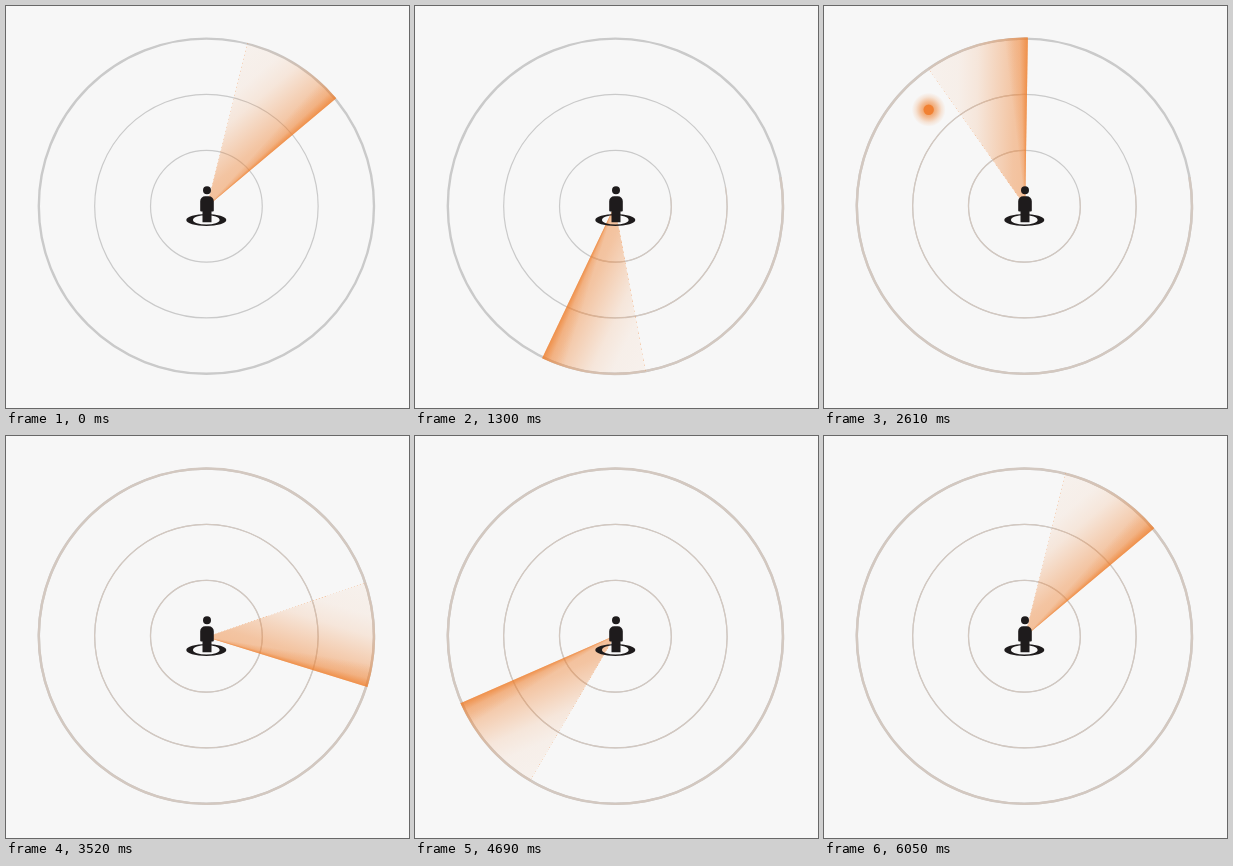
Animation of 403 by 402 pixels, one loop 6.12 s. Source, as an HTML page with a canvas:

```html
<!DOCTYPE html>
<html>
<head>
<meta charset="utf-8">
<style>
html, body { margin: 0; width: 100%; height: 100%; overflow: hidden; background: #f7f7f7; }
canvas { display: block; }
</style>
</head>
<body>
<canvas id="stage" width="403" height="402"></canvas>
<script>
const ctx = document.getElementById('stage').getContext('2d');
const LOOP = 6120, STEPS = 89, STEP = LOOP / STEPS;
const CX = 200.4, CY = 200.2, RADIUS = 167.6;
const SPAN = 36, TURN = 360 / 44, TINT_FROM = 80;
const rad = deg => deg * Math.PI / 180;

function gradient(g, stops) {
  for (const [at, alpha] of stops) g.addColorStop(at, `rgba(238,126,44,${alpha})`);
  return g;
}

const beamFill = gradient(ctx.createLinearGradient(0, 0, -99, 0),
  [[0, .46], [.13, .42], [.5, .14], [.7, .07], [1, .05]]);
// darkens towards the leading edge, tapering to the apex
const edgeFill = gradient(ctx.createConicGradient(rad(-90 - SPAN), 0, 0),
  [[0, 0], [(SPAN - 8) / 360, 0], [(SPAN - 3) / 360, .25], [SPAN / 360, .72], [.5, .72]]);
const glow = gradient(ctx.createRadialGradient(0, 0, 3, 0, 0, 17),
  [[0, .8], [.35, .52], [.7, .18], [1, 0]]);

function rings(color, from, to) {
  ctx.strokeStyle = color;
  for (let i = 1; i <= 3; i++) {
    ctx.lineWidth = i === 3 ? 2.4 : 1.2;
    ctx.beginPath();
    ctx.arc(CX, CY, RADIUS * i / 3, rad(from - 90), rad(to - 90));
    ctx.stroke();
  }
}

function beam(heading) {
  ctx.save();
  ctx.translate(CX, CY);
  ctx.rotate(rad(heading));
  ctx.translate(.8, 0);
  ctx.beginPath();
  ctx.moveTo(0, 0);
  ctx.arc(0, 0, RADIUS + 1.2, rad(-90 - SPAN), rad(-90));
  for (const fill of [beamFill, edgeFill]) {
    ctx.fillStyle = fill;
    ctx.fill();
  }
  ctx.restore();
}

function disc(r, fill) {
  ctx.fillStyle = fill;
  ctx.beginPath();
  ctx.arc(0, 0, r, 0, 7);
  ctx.fill();
}

// lights up as the beam passes, once per turn
function blip(time) {
  const p = (time % (LOOP / 2) - 1850) / 1140;
  if (p <= 0 || p >= 1) return;
  ctx.save();
  ctx.globalAlpha = Math.min(1, 1.1 * Math.sin(Math.PI * p));
  ctx.translate(104.7, 103.7);
  disc(17, glow);
  disc(5.2, '#f08030');
  ctx.restore();
}

function person() {
  ctx.fillStyle = '#1e1b1c';
  ctx.beginPath();
  ctx.ellipse(200.3, 214, 20, 6, 0, 0, 7);
  ctx.ellipse(200.3, 213.9, 13.3, 4.7, 0, 0, 7);
  ctx.fill('evenodd');
  ctx.beginPath();
  ctx.arc(201, 184.2, 4, 0, 7);
  ctx.roundRect(194.2, 190.2, 13.6, 15.3, [5, 5, 1, 1]);
  ctx.rect(196.5, 204, 9, 12.2);
  ctx.fill();
}

function draw(time) {
  const step = Math.min(STEPS - 1, Math.floor((time % LOOP + 10) / STEP));
  const heading = 50 + step * TURN;
  ctx.fillStyle = '#f7f7f7';
  ctx.fillRect(0, 0, 403, 402);
  rings('#cacaca', 0, 360);
  // the swept part of the rings keeps a warm tint
  if (heading > TINT_FROM) rings('#d3c8c0', TINT_FROM, Math.min(heading, TINT_FROM + 360));
  beam(heading);
  blip(step * STEP);
  person();
}

const start = performance.now();
function tick() {
  draw(performance.now() - start);
  requestAnimationFrame(tick);
}
tick();
</script>
</body>
</html>
```
